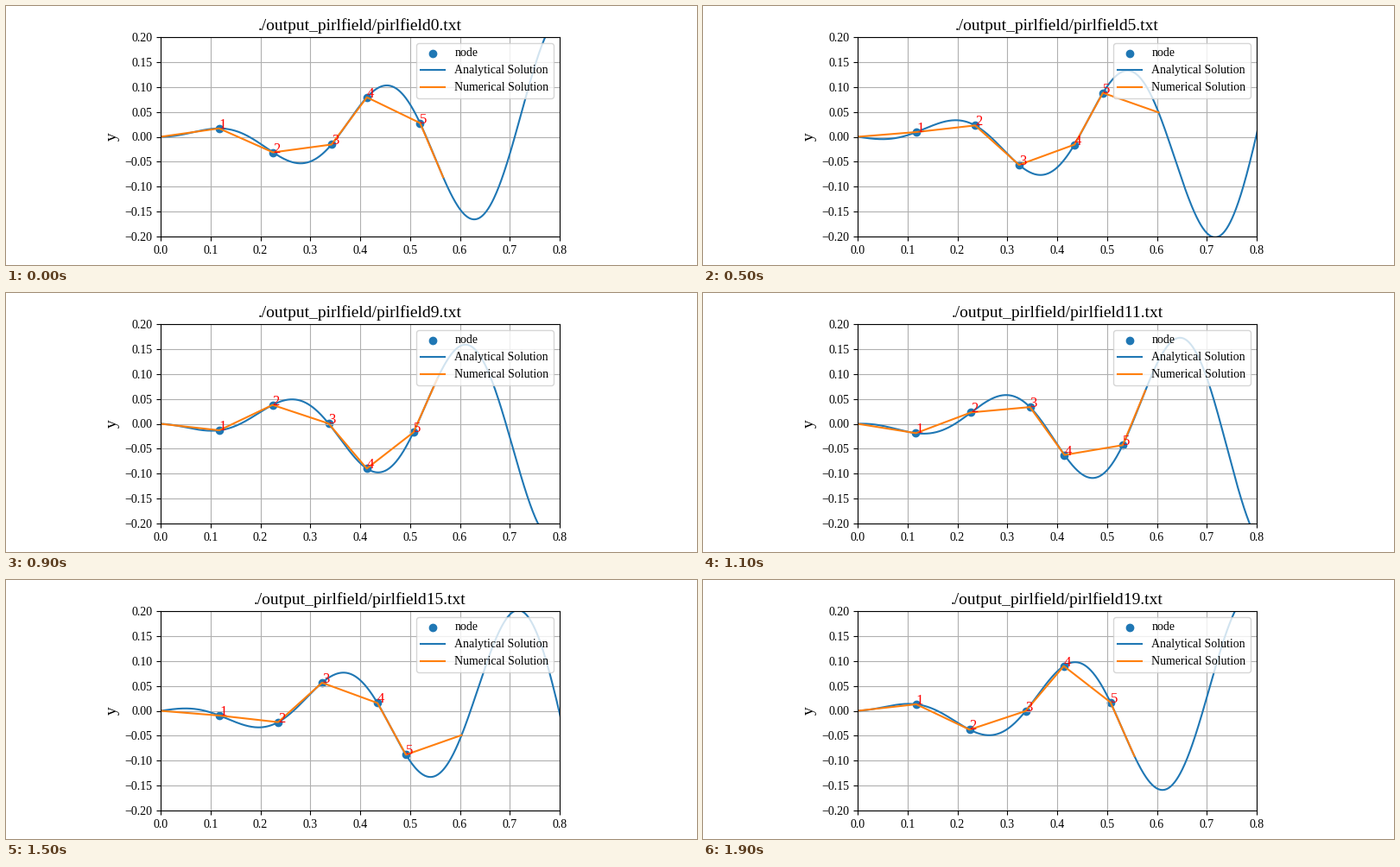
A matplotlib script for the animation above (2000 ms loop, 800 px wide and 300 px high).

```python
import numpy as np
import matplotlib.pyplot as plt
from matplotlib.animation import FuncAnimation

FRAMES = 20
BODY = 0.71            # body length, two wavelengths of the swimming wave
LINKS = 6
LINK = BODY / LINKS
K = 4 * np.pi / BODY

plt.rcParams["font.family"] = "Liberation Serif"


def wave(x, n):
    """Travelling wave with a growing envelope."""
    return (0.14 * x + 0.2 * x**2) * np.sin(K * x - 2 * np.pi * n / FRAMES)


def joints(n):
    """Ends of equal rigid links laid along the wave from the head."""
    pts = [(0.0, 0.0)]
    for _ in range(LINKS):
        x0, y0 = pts[-1]
        x = x0 + np.linspace(0, LINK * 1.01, 6001)
        y = wave(x, n)
        i = np.argmax(np.hypot(x - x0, y - y0) >= LINK)
        pts.append((x[i], y[i]))
    return np.array(pts)


fig, ax = plt.subplots(figsize=(8, 3), dpi=100)
ax.set_aspect("equal")
ax.set_xlim(0, 0.8)
ax.set_ylim(-0.2, 0.2)
ax.set_xticks(np.arange(9) / 10)
ax.set_yticks(np.arange(-4, 5) / 20)
ax.set_ylabel("y", fontsize=14)
ax.grid(True)

xs = np.linspace(0, 1, 800)
nodes = ax.scatter([0], [0], label="node")
curve, = ax.plot([], [], label="Analytical Solution")
chain, = ax.plot([], [], label="Numerical Solution")
tags = [ax.text(0, 0, str(i), color="red", fontsize=12)
        for i in range(1, LINKS)]
title = ax.set_title("", fontsize=14)
ax.legend(loc="upper right")


def draw(n):
    pts = joints(n)
    curve.set_data(xs, wave(xs, n))
    chain.set_data(pts[:, 0], pts[:, 1])
    nodes.set_offsets(pts[1:-1])
    for tag, p in zip(tags, pts[1:-1]):
        tag.set_position(p)
    title.set_text(f"./output_pirlfield/pirlfield{n}.txt")
    return [curve, chain, nodes, title, *tags]


def init():
    return draw(0)


anim = FuncAnimation(fig, draw, frames=FRAMES, init_func=init,
                     interval=100, repeat=True, repeat_delay=0)
plt.show()
```
